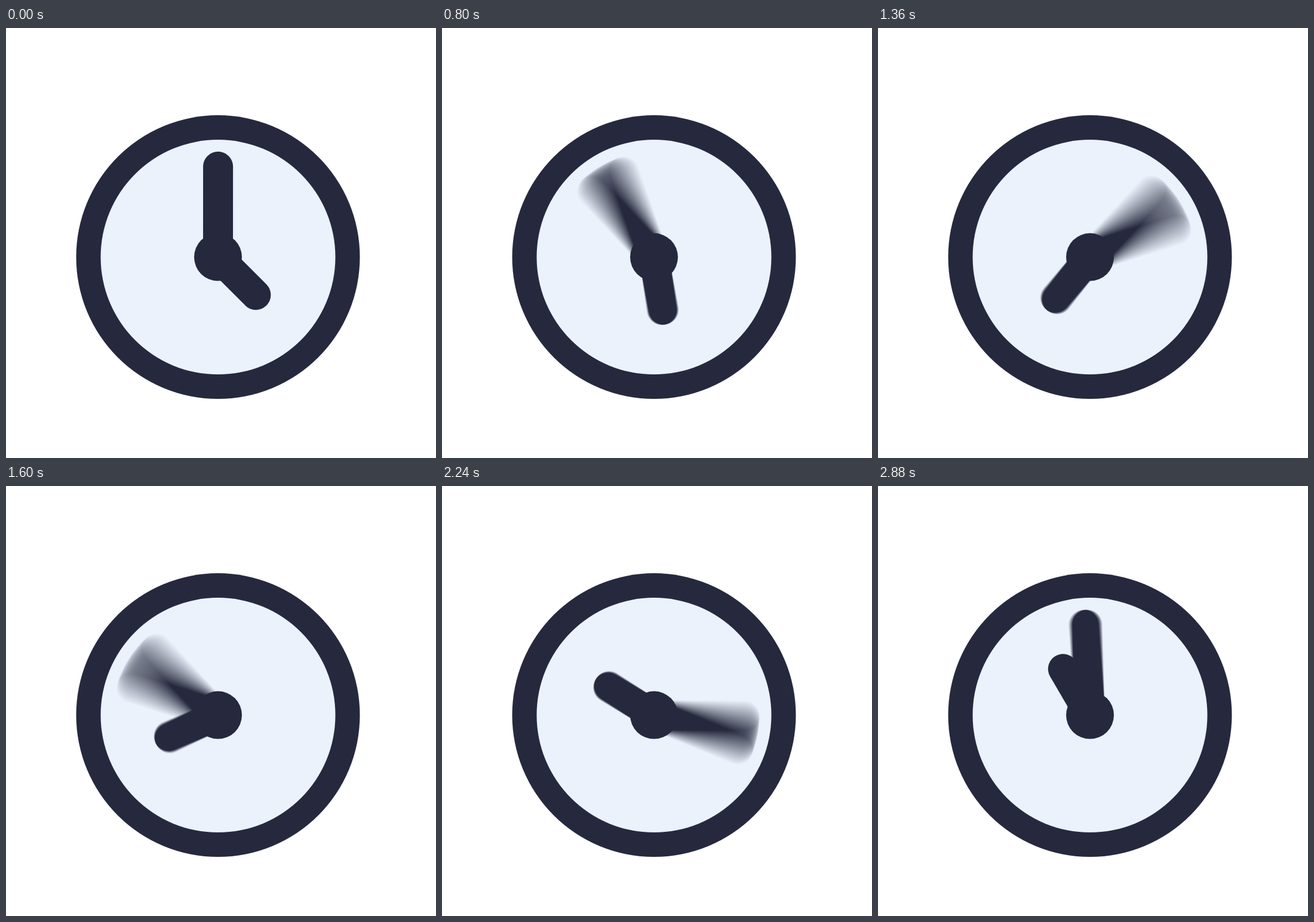
These frames come from a looping animation (720 by 720 pixels, 2960 ms). An HTML page with a canvas:

```html
<!DOCTYPE html>
<html lang="en">
<head>
<meta charset="utf-8">
<title>Clock</title>
<style>
  html, body { margin: 0; width: 100%; height: 100%; overflow: hidden; background: #fff; }
  canvas { display: block; width: 720px; height: 720px; }
</style>
</head>
<body>
<canvas id="stage" width="720" height="720"></canvas>
<script>
const SIZE = 720;
const CENTER = { x: 355, y: 383.6 };
const DARK = '#26293d';
const FACE = '#ebf2fc';

const LOOP = 2960;        // ms
const STEP = 80;          // ms each picture stays
const SHUTTER = 1000 / 30; // ms, also the time grid of the motion
const TRAVEL = 88 * SHUTTER;
const SAMPLES = 51;       // divides 255, so the sample alphas add up exactly

const HANDS = [
  { length: 151.5, from: 0, turn: 1800 },
  { length: 89.5, from: 135, turn: 195 }
];

const ctx = document.getElementById('stage').getContext('2d');
const layer = document.createElement('canvas');
layer.width = layer.height = SIZE;
const mask = layer.getContext('2d');

function progress(time) {
  const x = Math.min(1, Math.max(0, time / TRAVEL));
  return x * x * (3 - 2 * x);
}

function disc(radius, color) {
  ctx.fillStyle = color;
  ctx.beginPath();
  ctx.arc(CENTER.x, CENTER.y, radius, 0, 2 * Math.PI);
  ctx.fill();
}

// Average the hand's positions over the open shutter, then tint the result.
function drawHand(hand, time) {
  mask.globalCompositeOperation = 'source-over';
  mask.globalAlpha = 1;
  mask.clearRect(0, 0, SIZE, SIZE);

  mask.globalCompositeOperation = 'lighter';
  mask.globalAlpha = 1 / SAMPLES;
  mask.lineWidth = 50;
  mask.lineCap = 'round';
  for (let i = 0; i < SAMPLES; i++) {
    const moment = time + ((i + 0.5) / SAMPLES - 0.5) * SHUTTER;
    const angle = (hand.from + hand.turn * progress(moment)) * Math.PI / 180;
    mask.beginPath();
    mask.moveTo(CENTER.x, CENTER.y);
    mask.lineTo(CENTER.x + hand.length * Math.sin(angle),
                CENTER.y - hand.length * Math.cos(angle));
    mask.stroke();
  }

  mask.globalCompositeOperation = 'source-in';
  mask.globalAlpha = 1;
  mask.fillStyle = DARK;
  mask.fillRect(0, 0, SIZE, SIZE);
  ctx.drawImage(layer, 0, 0);
}

function draw(time) {
  ctx.fillStyle = '#fff';
  ctx.fillRect(0, 0, SIZE, SIZE);
  disc(237.5, DARK);
  disc(196.5, FACE);
  HANDS.forEach(hand => drawHand(hand, time));
  disc(40, DARK);
}

const start = performance.now();
let shown = -1;

function tick() {
  const elapsed = Math.max(0, performance.now() - start) % LOOP;
  const step = Math.floor(elapsed / STEP);
  if (step !== shown) {
    shown = step;
    draw(Math.floor(step * STEP / SHUTTER + 1e-6) * SHUTTER);
  }
  requestAnimationFrame(tick);
}
tick();
</script>
</body>
</html>
```
